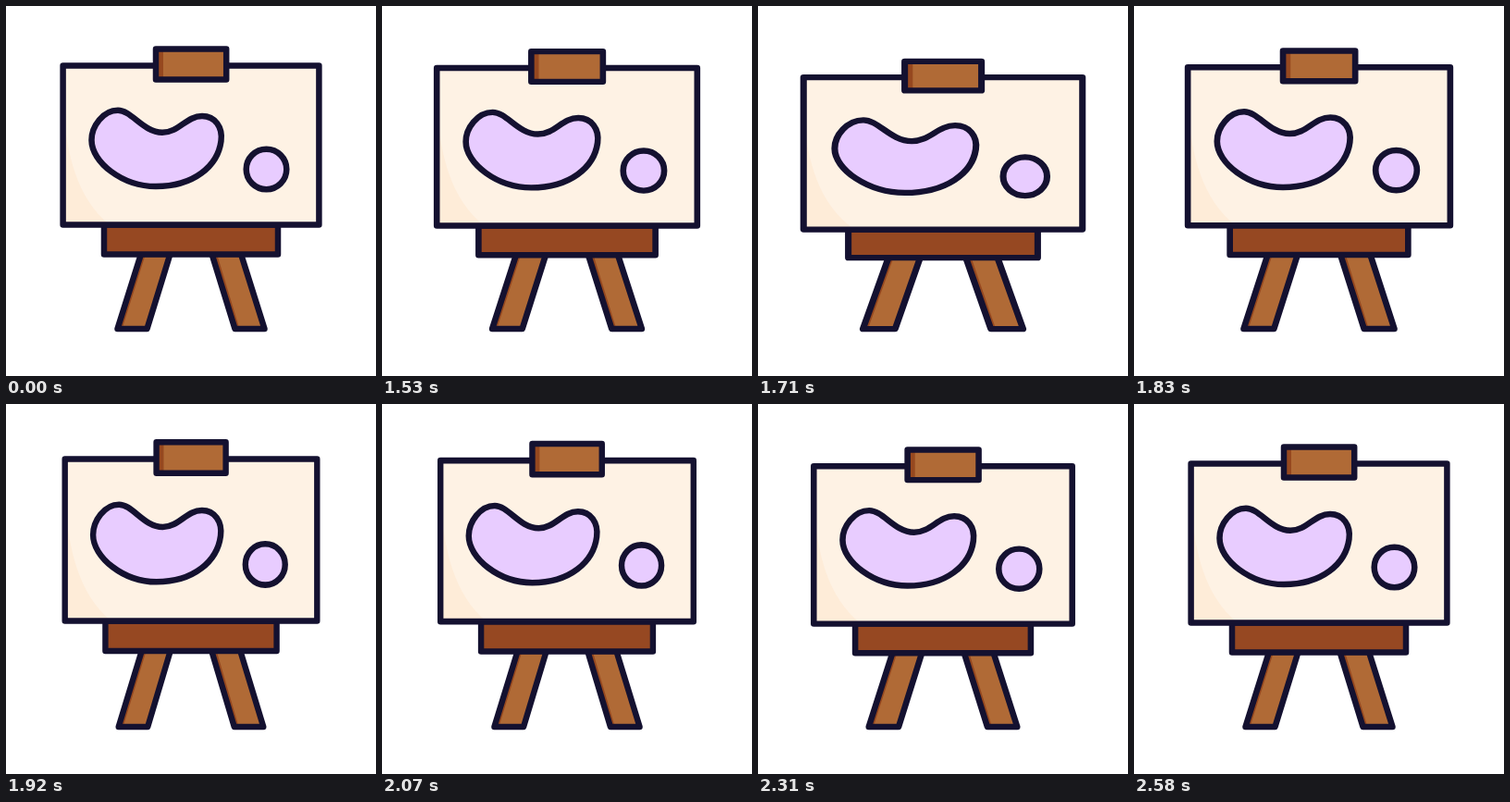
These frames come from a looping animation (400x400 px, 2610 ms). An HTML page:

```html
<!DOCTYPE html>
<html lang="en">
<head>
<meta charset="utf-8">
<title>Bouncing easel</title>
<style>
  html, body { margin: 0; width: 100%; height: 100%; overflow: hidden; background: #fff; }
  svg { display: block; width: 100vw; height: 100vh; }
  .line { fill: none; stroke: #141130; stroke-width: 6.5; stroke-linejoin: round; }
  .wood { fill: #b06a36; }
  .dark { fill: #96481f; }
  .lilac { fill: #e8ccff; }
</style>
</head>
<body>
<svg viewBox="0 0 400 400">
  <g id="easel">
    <!-- legs -->
    <path class="wood" d="M120.5 349L146 268H177.5L152.5 349ZM279.5 349L254 268H222.5L247.5 349Z"/>
    <path class="dark" d="M120.5 349L146 268H151L125.5 349ZM247.5 349L222.5 268H228L252.5 349Z"/>
    <path class="line" d="M120.5 349L146 268H177.5L152.5 349ZM279.5 349L254 268H222.5L247.5 349Z"/>
    <!-- tray -->
    <path class="line" style="fill:#964822" d="M106 236.5H294V268.5H106Z"/>
    <!-- canvas -->
    <path fill="#fef2e4" d="M61.6 64.5H338.4V236.5H61.6Z"/>
    <path fill="#feecd8" d="M61.6 110C66 160 76 207 112 236.5H61.6Z"/>
    <path class="line" d="M61.6 64.5H338.4V236.5H61.6Z"/>
    <!-- clip -->
    <path class="wood" d="M162 46.5H238.2V79.5H162Z"/>
    <path class="dark" d="M162 46.5H170V79.5H162Z"/>
    <path class="line" d="M162 46.5H238.2V79.5H162Z"/>
    <!-- painting -->
    <g class="line">
      <path class="lilac" d="M121 112.8C136 112.8 148 136.5 169 136.7C187 136.7 195 119 212 119C226 119 234.500 131 232.500 146C229 173 203 195 162 195C126 195 92.500 169 92.500 145C92.500 130 105 112.800 121 112.800Z"/>
      <circle class="lilac" cx="281.5" cy="176.5" r="21.8"/>
    </g>
  </g>
</svg>
<script>
  const LOOP = 2610, START = 1530;
  // time, scale x, scale y
  const poses = [
    [1485, 1, 1],
    [1650, 1.1, 0.95],
    [1960, 0.98, 1.02],
    [2270, 1.01, 0.99],
    [2580, 1, 1]
  ];
  const easel = document.getElementById('easel');

  function scaleAt(t) {
    const i = poses.findIndex(p => p[0] > t);
    if (t < START || i < 1) return [1, 1];
    const [a, b] = [poses[i - 1], poses[i]];
    const k = (1 - Math.cos(Math.PI * (t - a[0]) / (b[0] - a[0]))) / 2;
    return [1, 2].map(j => a[j] + (b[j] - a[j]) * k);
  }

  function draw() {
    const t = Math.floor(performance.now() % LOOP / 30) * 30;
    const scale = scaleAt(t);
    easel.setAttribute('transform', `translate(200 352.5) scale(${scale}) translate(-200 -352.5)`);
    requestAnimationFrame(draw);
  }
  draw();
</script>
</body>
</html>
```
